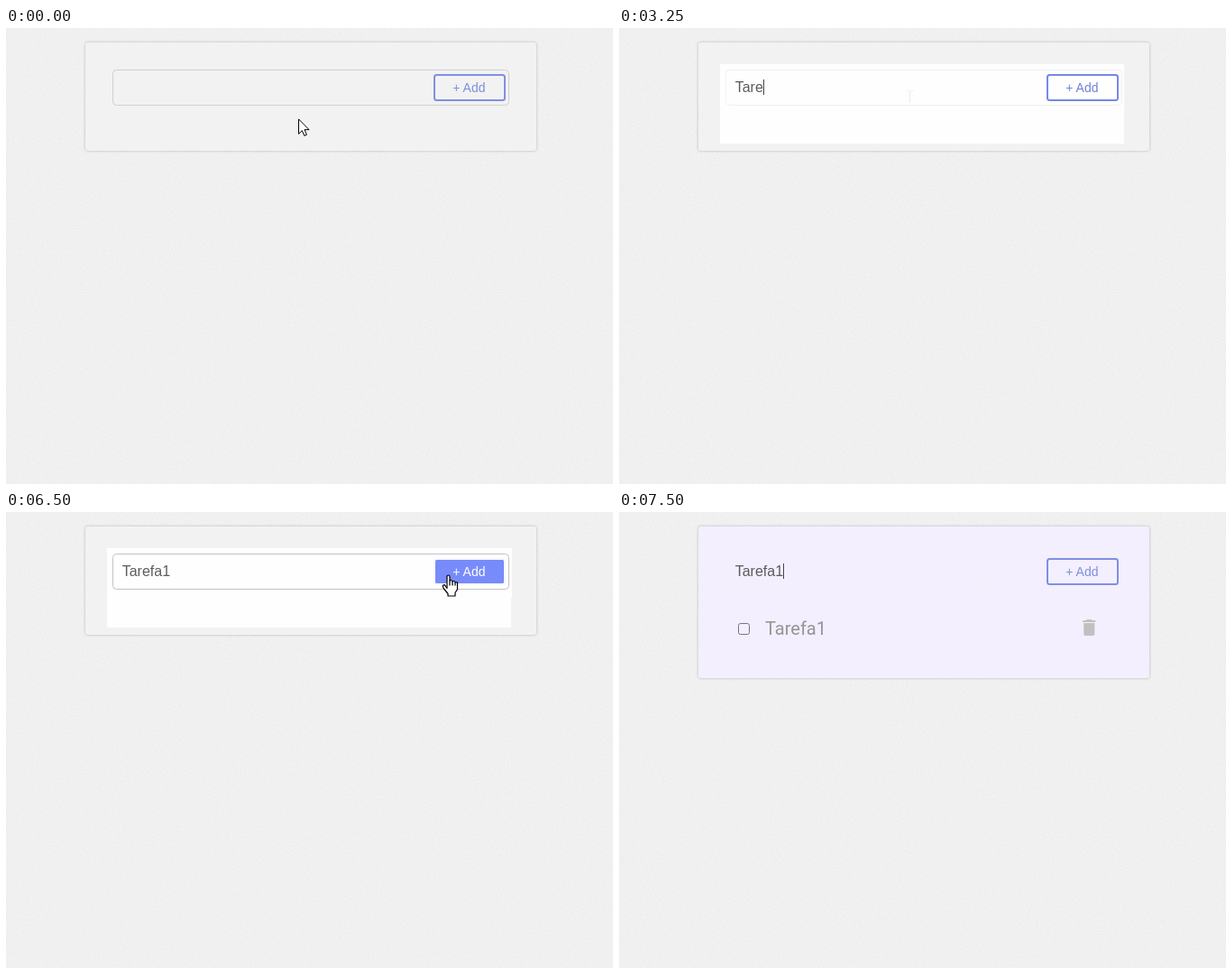
Recreate the animation shown at these times as an HTML page. Size 673x505 px, loop 8000 ms.

```html
<!DOCTYPE html>
<html lang="pt">
<head>
<meta charset="utf-8">
<style>
html, body { margin: 0; height: 100%; overflow: hidden; background: #f0f0f0; }
svg { display: block; width: 673px; height: 505px; }
text { font-family: "Liberation Sans", Arial, sans-serif; white-space: pre; }
#card { filter: drop-shadow(0 0 1.5px rgba(0, 0, 0, .25)); }
</style>
</head>
<body>
<svg viewBox="0 0 673 505">
  <filter id="paper" x="0" y="0" width="1" height="1" color-interpolation-filters="sRGB">
    <feTurbulence type="fractalNoise" baseFrequency=".55" numOctaves="2" seed="4"/>
    <feColorMatrix values=".04 0 0 0 .921  .04 0 0 0 .921  .04 0 0 0 .921  0 0 0 0 1"/>
  </filter>
  <rect width="673" height="505" filter="url(#paper)"/>

  <rect id="card" x="88" y="16" width="500" rx="3"/>
  <path id="patch" fill="#fefefe"/>
  <path id="lower" fill="#fefefe" d="M88 111h500v70q0 3-3 3H91q-3 0-3-3z"/>

  <rect id="field" x="118.5" y="46.5" width="439" height="39" rx="4" fill="none"/>
  <text id="typed" x="128.7" y="71" font-size="16" fill="#5c5c5c"></text>
  <rect id="caret" width="1" height="17" fill="#444"/>
  <rect id="button" x="475" y="52" width="78" height="28" rx="2.5" stroke-width="2"/>
  <text id="label" x="495.3" y="71" font-size="14">+ Add</text>

  <g id="item">
    <rect x="132.5" y="123.5" width="12" height="12" rx="2.2" fill="none" stroke="#767676"/>
    <text x="162" y="136" font-size="20" fill="#959595" style="font-family:Roboto,sans-serif">Tarefa1</text>
    <path transform="translate(509.3 116)" fill="#c0c0c0" d="M6 19c0 1.1.9 2 2 2h8c1.1 0 2-.9 2-2V7H6zM19 4h-3.5l-1-1h-5l-1 1H5v2h14z"/>
    <rect id="rule" x="118" y="153" width="440" height="1"/>
  </g>

  <path id="beam" fill="none" d="M-3 .5h2.5M1.5 .5h2.5M.5 1v13"/>
  <path id="arrow" transform="translate(324 100)" fill="#fff" stroke="#000" d="M.5.9V17.3L4.3 13.6L6.8 19.3L9.4 18.2L7 12.6H12z"/>
  <g id="hand" transform="translate(483.5 69.5)" fill="#fff" stroke="#000" stroke-width="1.2" stroke-linejoin="round">
    <path d="M5.5 15V2.2Q5.5.5 7 .5T8.5 2.2V7Q8.5 6 10 6T11.5 8Q11.5 7 13 7T14.5 9Q14.5 8 16 8.3T17 10V16L14.5 20V23.5H6.5V21L2 15.5Q0 12.5 1.5 11.5T4 13Z"/>
    <path fill="none" d="M8.5 7v5M11.5 8v4M14.5 9v3"/>
  </g>
</svg>
<script>
const LOOP = 8000;
const el = id => document.getElementById(id);
const show = (id, on) => el(id).setAttribute('visibility', on ? 'visible' : 'hidden');
const set = (id, attrs) => {
  for (const k in attrs) el(id).setAttribute(k, attrs[k]);
};

// Each track lists [start time, value]; values hold until the next entry.
const typing = [[0, 0], [2500, 1], [3000, 3], [3250, 4], [3500, 5], [3750, 6], [5000, 7]];
const caret = [[0, 0], [250, 1], [1000, 0], [1500, 1], [2000, 0], [2500, 1],
  [4250, 0], [5000, 1], [5500, 0], [6000, 1], [6500, 0], [7500, 1]];
const pointer = [[0, 'arrow'], [250, [322, 69]], [5750, null], [6000, [484, 79]],
  [6250, 'hand'], [7000, [453, 70]], [7250, [401, 69]]];
const at = (track, t) => track.findLast(([start]) => start <= t)[1];

function draw(t) {
  const idle = t < 250, added = t >= 6750, tinted = t >= 7500;
  const hover = t >= 6250 && t < 7000;
  const sharp = t >= 6500 && !tinted;

  set('card', { height: added ? 168 : 120, fill: tinted ? '#f3effe' : '#f2f2f2' });
  show('patch', !idle && !tinted);
  set('patch', { d: sharp ? 'M112 40h449v55h-1v33H112z' : 'M112 40h448v88H112z' });
  show('lower', added && !tinted);
  set('field', { stroke: idle ? '#cfcfcf' : sharp ? '#c2c2c2' : tinted ? '#f5f2f4' : '#f1f1f1' });

  el('typed').textContent = 'Tarefa1'.slice(0, at(typing, t));
  const end = 129 + el('typed').getComputedTextLength();
  set('caret', { x: Math.round(end), y: at(typing, t) ? 57 : 58 });
  show('caret', at(caret, t));

  const blue = idle || tinted ? '#808fe2' : '#7588ea';
  set('button', { fill: hover ? '#778bfb' : 'none', stroke: hover ? '#f6f7fd' : blue });
  set('label', { fill: hover ? '#fff' : idle || tinted ? '#7f8fd9' : '#7081d6' });

  show('item', added);
  set('rule', { fill: tinted ? '#f3effa' : '#e6e6e6' });

  const p = at(pointer, t);
  show('arrow', p === 'arrow');
  show('hand', p === 'hand');
  show('beam', Array.isArray(p));
  if (Array.isArray(p)) set('beam', { transform: `translate(${p})`, stroke: tinted ? '#f4f1f8' : '#eaeaea' });
}

function tick(now) {
  draw(now % LOOP);
  requestAnimationFrame(tick);
}
draw(0);
requestAnimationFrame(tick);
</script>
</body>
</html>
```
